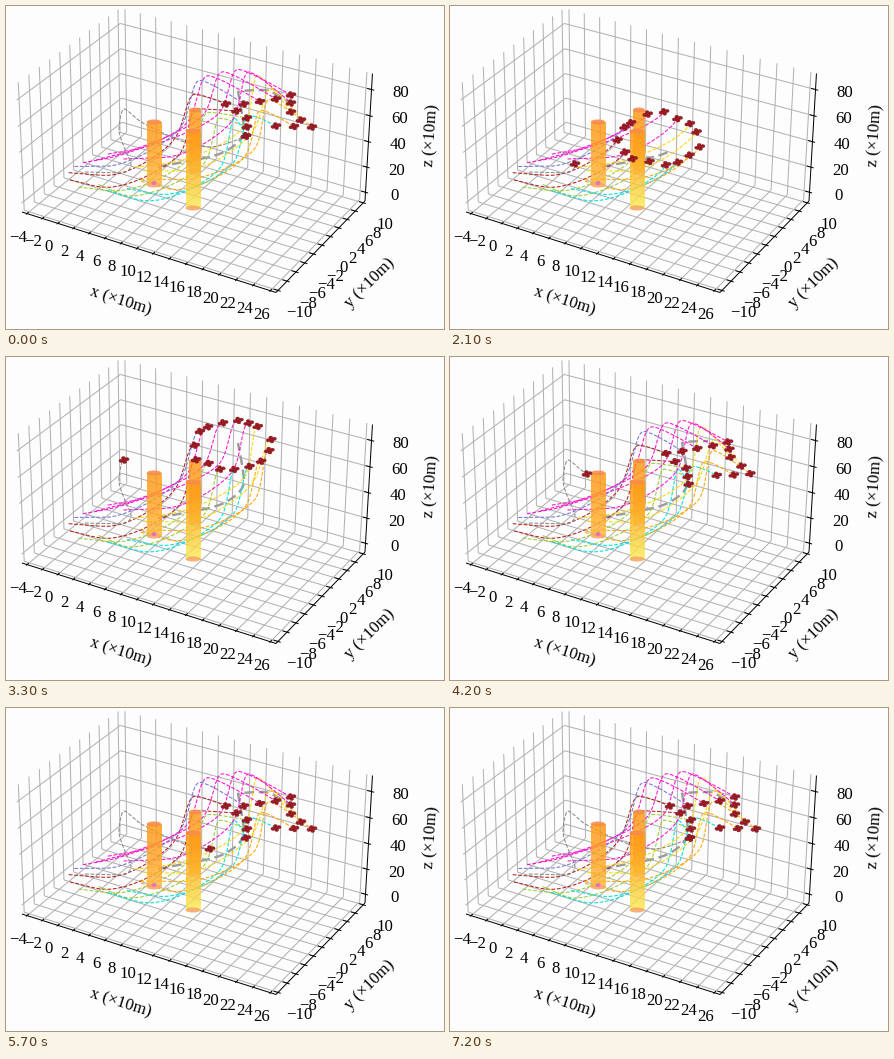
Animation, 438 px wide and 323 px high, one loop 7500 ms. Source, as a matplotlib script:

```python
import numpy as np
import matplotlib.pyplot as plt
from matplotlib.animation import FuncAnimation
from matplotlib.collections import EllipseCollection, LineCollection
from matplotlib.patches import Ellipse

W, H, DPI = 438, 323, 64
PT = 72 / DPI            # points per pixel
STEP = 300               # ms per frame
FRAMES = 25

plt.rcParams["font.family"] = "Liberation Serif"
fig = plt.figure(figsize=(W / DPI, H / DPI), dpi=DPI, facecolor="#fdfdfd")
ax = fig.add_axes([0, 0, 1, 1])
ax.axis("off")


# ---- 3D box: perspective map from unit cube to pixels ----
def project(x, y, z):
    w = 1 - 0.060 * x + 0.067 * y - 0.038 * z
    u = 16 + 237.8 * x + 107.7 * y - 6.4 * z
    v = 206 + 63.3 * x - 72.9 * y - 131 * z
    return u / w, v / w


def unit(value, low, high):
    """Position along a box edge, with a small margin at both ends."""
    return (1 + 46 * (value - low) / (high - low)) / 48


def segments(ends, color, z):
    lines = [[project(*a), project(*b)] for a, b in ends]
    ax.add_collection(LineCollection(lines, colors=color,
                                     linewidths=PT, zorder=z))


def label(text, x, y, angle=0):
    ax.text(x, y, text, fontsize=16.8 * PT, rotation=angle,
            ha="center", va="center", zorder=2)


def tick_label(value, pos, shift):
    label(str(value).replace("-", "\u2212"), pos[0] + shift[0], pos[1] + shift[1])


def draw_box():
    grid, ticks = [], []
    out, inner = 1 / 100, 1 / 60
    for v in range(-4, 27, 2):
        x = unit(v, -4, 26)
        grid += [((x, 0, 0), (x, 1, 0)), ((x, 1, 0), (x, 1, 1))]
        ticks.append(((x, -out, 0), (x, inner, 0)))
        tick_label(v, project(x, 0, 0), (-9, 24))
    for v in range(-10, 11, 2):
        y = unit(v, -10, 10)
        grid += [((0, y, 0), (1, y, 0)), ((0, y, 0), (0, y, 1))]
        ticks.append(((1 - inner, y, 0), (1 + out, y, 0)))
        tick_label(v, project(1, y, 0), (21.5, 22.5))
    for v in range(0, 81, 20):
        z = unit(v, -5, 90)
        grid += [((0, 0, z), (0, 1, z)), ((0, 1, z), (1, 1, z))]
        ticks.append(((1 - inner, 1, z), (1 + out, 1, z)))
        tick_label(v, project(1, 1, z), (29.5, 3.5))

    edges = [((0, 0, 0), (1, 0, 0)), ((1, 0, 0), (1, 1, 0)),
             ((1, 1, 0), (1, 1, 1))]
    segments(grid, "#b0b0b0", 1)
    segments(edges + ticks, "black", 2)
    label("x (×10m)", 115, 295, -17.5)
    label("y (×10m)", 364, 277, 45)
    label("z (×10m)", 425, 129, 86.4)


# ---- obstacles ----
def cylinder(cx, width, top, bottom, low_color, z):
    ramp = np.linspace(0, 1, 60)[:, None]
    high = np.array([255, 153, 20]) / 255
    rgb = high + (np.array(low_color) / 255 - high) * ramp ** 1.5
    rgba = np.dstack([rgb[:, None, :], np.full((60, 1), 0.82)])
    ax.imshow(rgba, extent=(cx - width / 2, cx + width / 2, bottom, top),
              aspect="auto", interpolation="bilinear", zorder=z)
    for y, color in ((bottom, "#f8a868"), (top, "#f88c48")):
        ax.add_patch(Ellipse((cx, y), width, 5, facecolor=color, alpha=0.9,
                             edgecolor="none", zorder=z + 0.1))


# ---- flight paths ----
class Path:
    """Smooth curve through timed points, without overshoot."""

    def __init__(self, times, points):
        self.t = np.array(times, float)
        self.p = np.array(points, float)
        s = np.diff(self.p, axis=0) / np.diff(self.t)[:, None]
        a, b = s[:-1], s[1:]
        total = np.where(a + b == 0, 1, a + b)
        mid = np.where(a * b > 0, 2 * a * b / total, 0)
        self.m = np.vstack([s[:1], mid, np.zeros((1, 2))])

    def at(self, t):
        t = np.clip(np.atleast_1d(t), self.t[0], self.t[-1])
        k = np.clip(np.searchsorted(self.t, t) - 1, 0, len(self.t) - 2)
        h = (self.t[k + 1] - self.t[k])[:, None]
        u = (t - self.t[k])[:, None] / h
        return ((1 + 2 * u) * (1 - u) ** 2 * self.p[k]
                + u * (1 - u) ** 2 * h * self.m[k]
                + u * u * (3 - 2 * u) * self.p[k + 1]
                + u * u * (u - 1) * h * self.m[k + 1])

    def trail(self, now):
        end = min(max(now, self.t[0]), self.t[-1])
        return self.at(np.linspace(self.t[0], end, 140))


SWARM = 15
LANDED = 4.5             # s, when the swarm has taken its final places
RING_TIMES = [0.3, 0.9, 2.1, 3.3]
RINGS = [(101, 167, 37, 16), (138, 168, 41, 25),    # centre and radii
         (210, 134, 39, 27), (226, 88, 36, 25)]
COLORS = ["firebrick", "yellowgreen", "#00e0e0", "orange",
          "gold", "#ff10d0", "#ff10d0", "#7474d8"]


def row(start, end, n):
    return list(zip(np.linspace(start[0], end[0], n),
                    np.linspace(start[1], end[1], n)))


def swarm_paths():
    """A ring flies through the obstacles, then unrolls into two lines."""
    slots = (row((220, 98), (241, 112), 3) + row((241, 121), (240, 130), 2)
             + row((270, 120), (306, 121), 3) + row((295, 114), (285, 106), 2)
             + row((285, 97), (285, 89), 2) + row((270, 93), (238, 98), 3))
    rng = np.random.default_rng(4)
    paths = []
    for i, slot in enumerate(slots):
        turn = 2 * np.pi * i / SWARM
        points = [(cx - rx * np.cos(turn), cy + ry * np.sin(turn))
                  for cx, cy, rx, ry in RINGS]
        points = np.array(points) + rng.normal(0, 2, (len(RINGS), 2))
        paths.append(Path(RING_TIMES + [LANDED], np.vstack([points, slot])))
    return paths


draw_box()
cylinder(189, 12, 104, 165, (255, 180, 50), 4)
cylinder(148, 14.5, 116, 179, (255, 185, 60), 4.3)
cylinder(187, 15, 125, 202, (250, 238, 85), 4.6)
ax.add_patch(Ellipse((148, 177), 4, 3, color="#e870b8", zorder=4.9))

straggler = Path([0.3, 0.9, 2.1, 2.7, 3.3, 4.2, 5.7, 6.6],
                 [(79, 166), (115, 167), (125, 158), (113, 124),
                  (118, 103), (137, 117), (204, 141), (240, 130)])
guide = Path([1.2, 2.1, 2.7, 3.3, 4.2, 5.1],
             [(152, 161), (218, 146), (238, 124), (232, 86), (258, 84), (285, 98)])
paths = swarm_paths() + [straggler]

trails = [ax.plot([], [], color=COLORS[i // 2], lw=1.05 * PT,
                  dashes=(3.6, 1.6), zorder=3)[0] for i in range(len(paths))]
trails[-1].set_color("#8a8a8a")
guide_line, = ax.plot([], [], color="#9c9c9c", lw=2.4 * PT, dashes=(4, 2),
                      zorder=2.8)

# four rotors and a hub per drone
PARTS = np.array([(-3.1, 0.8), (3.1, -0.8), (0.6, 1.9), (-0.6, -1.9), (0, 0)])
count = len(paths) * len(PARTS)
drones = EllipseCollection(np.full(count, 3.9), np.full(count, 3.1),
                           np.zeros(count), units="xy",
                           offsets=np.zeros((count, 2)),
                           offset_transform=ax.transData,
                           facecolors="#a01c26", edgecolors="#7c1018",
                           linewidths=0.4 * PT, zorder=6)
ax.add_collection(drones)
ax.set_xlim(0, W)
ax.set_ylim(H, 0)


def update(i):
    if i in (12, 23):    # pauses
        i -= 1
    now = (i or FRAMES) * STEP / 1000
    for line, path in zip(trails, paths):
        line.set_data(*path.trail(now).T)
    guide_line.set_data(*guide.trail(now).T)
    spots = np.vstack([path.at(now) for path in paths])
    drones.set_offsets((spots[:, None] + PARTS).reshape(-1, 2))
    return trails + [guide_line, drones]


anim = FuncAnimation(fig, update, frames=FRAMES, interval=STEP,
                     repeat=True, repeat_delay=0, blit=False)
plt.show()
```
